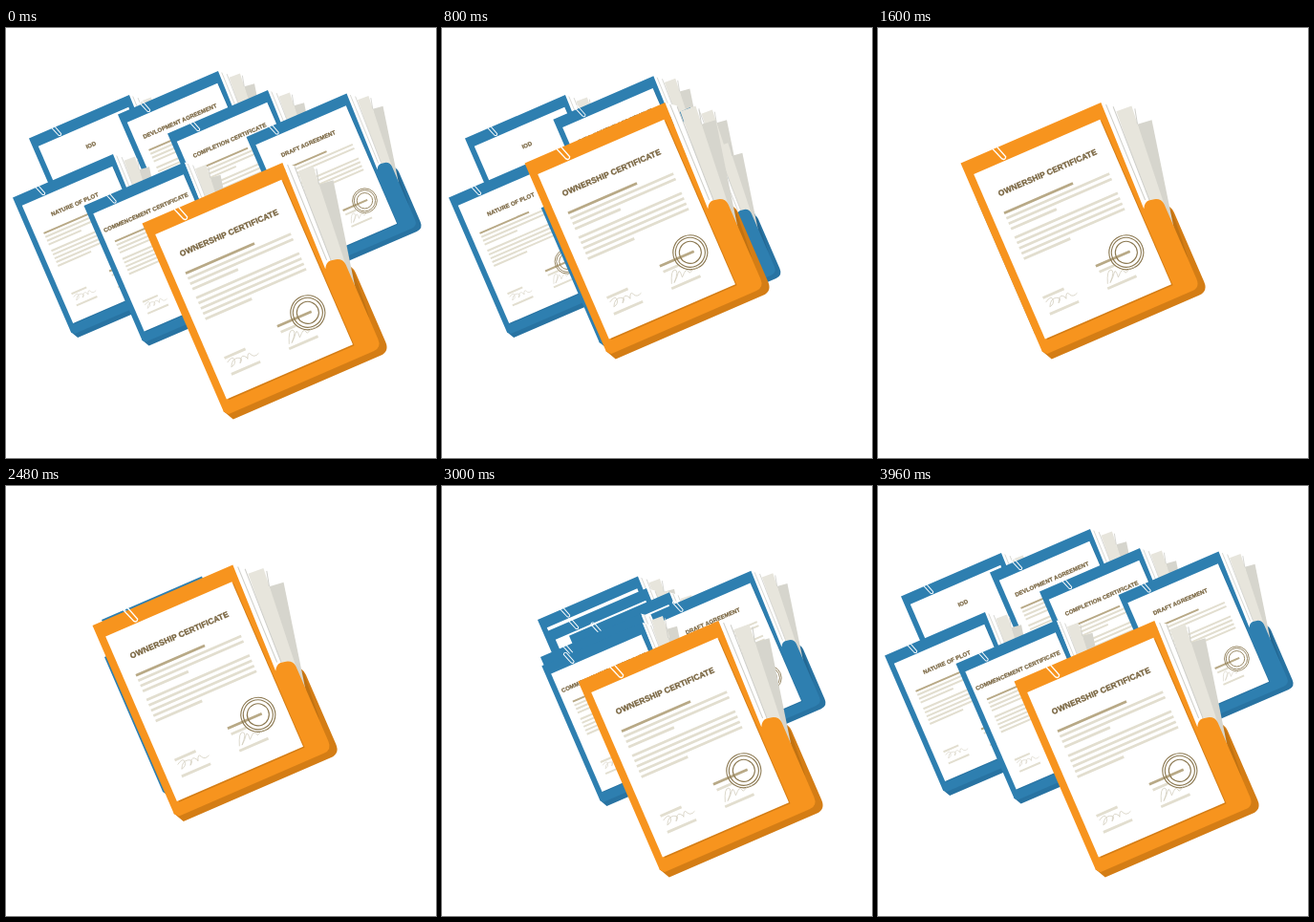
Recreate the animation shown at these times as an HTML page. Size 450x450 px, loop 4.4 s.

```html
<!DOCTYPE html>
<html lang="en">
<head>
<meta charset="utf-8">
<title>Folders</title>
<style>
html, body { margin: 0; width: 100%; height: 100%; overflow: hidden; background: #fff; }
svg { display: block; width: 100vw; height: 100vh; }
text {
  font: bold 8.4px "Liberation Sans", Arial, sans-serif; letter-spacing: .14px;
  fill: #78643f; stroke: #78643f; stroke-width: .35; text-anchor: middle;
}
.orange { --front: #f7941e; --back: #d47d15; --shade: #c07212; }
.blue { --front: #2e7fb0; --back: #2873a2; --shade: #236792; }
.front { fill: var(--front); }
.back { fill: var(--back); }
.shade { fill: var(--shade); }
.dark { stroke: #b8a986; }
.light { stroke: #e2decf; }
.dark, .light { stroke-width: 2.8; fill: none; }
.ring { fill: none; stroke: #8b7850; stroke-width: 1.1; }
.pen { fill: none; stroke: #d3cdbd; stroke-width: .7; }
.clip { fill: none; stroke: #fff; stroke-width: 1.3; stroke-linecap: round; }
</style>
</head>
<body>
<svg id="stage" viewBox="0 0 450 450"></svg>
<script>
const LOOP = 4400, STEP = 40, OUT = 560, IN = 600, TILT = -23.4;

// Back to front: title, home x and y, shift when stacked, start of gathering, start of spreading
const folders = [
  ["IOD", 24, 115.5, 76, 24.5, 1000, 3400],
  ["DEVLOPMENT AGREEMENT", 117, 90.5, -8, 62, 750, 3100],
  ["COMPLETION CERTIFICATE", 169, 110.5, -42, 54, 600, 2920],
  ["DRAFT AGREEMENT", 251.5, 114, -103, 63, 333, 2620],
  ["NATURE OF PLOT", 7, 177.5, 96, 1.5, 867, 3240],
  ["COMMENCEMENT CERTIFICATE", 81.5, 186, 40, 4, 467, 2760],
  ["OWNERSHIP CERTIFICATE", 142.5, 204.5, -56, -63, 200, 2440]
];

const rows = list => list.map(([x, y, end]) => `M${x} ${y}H${end}`).join("");
const long = [72, 78, 94, 100, 106, 112].map(y => [21, y, 138.5]);
const lightRows = rows([...long, [21, 84, 73], [21, 118, 74],
  [88, 162, 105], [89, 181.5, 122], [23, 163.5, 47], [23, 182, 56]]);
const darkRows = rows([[21, 66, 99.5], [87, 155, 126]]);
const rings = [18, 15.5, 11.5].map(r => `<circle class="ring" cx="122" cy="154.500" r="${r}"/>`).join("");

const body = `
  <path class="light" d="${lightRows}"/>
  <path class="dark" d="${darkRows}"/>
  ${rings}
  <path class="pen" d="M24 169q8-5 8 0t-6 6q4-8 10-6t0 6q4-8 7-5t2 4q3-8 5-3t8 2"/>
  <path class="pen" d="M91 177q5-14 9-12t-6 12q5-4 8-8t2 6q4-4 6-5t3 4q6-4 11-2"/>`;

const drawFolder = title => `
  <path class="back" d="M0 214L6 226H174Q184.500 226 184.500 215V136Q184.500 128 177 124L160 114Z"/>
  <path class="shade" d="M170 118L178 123Q183 128 183 136L179 186Z"/>
  <path fill="#d6d5cd" d="M186 36L201.500 38L178 150L170 130Z"/>
  <path fill="#fff" d="M172 22L186 28L175 134L166 120Z"/>
  <path fill="#e7e5dc" d="M171 15L188 16L178 128L164 118Z"/>
  <path fill="#fff" d="M160 0L170 8L166 120H156Z"/>
  <path fill="none" stroke="#cfcfca" d="M164 4L162 112M170 9L166 114M190 20L186 36"/>
  <path class="front" d="M0 0H160L157 120Q160 114 165 114L171 115Q178 117 178.500 124V209Q178.500 219 169 219H4L0 215Z"/>
  <path class="back" d="M10 18H153V205.500H10Z"/>
  <path fill="#fff" d="M8 16H152V204H8Z"/>
  <text x="79.500" y="48">${title}</text>
  ${title === "IOD" ? "" : body}
  <path class="clip" d="M38 3L41.500 13q2.500 3 4.500-.5L41-3q-3-3-5 .5L40 9"/>`;

const stage = document.getElementById("stage");
const isFront = i => i === folders.length - 1;
stage.innerHTML = folders.map(([title], i) =>
  `<g class="${isFront(i) ? "orange" : "blue"}">${drawFolder(title)}</g>`).join("");

const clamp = v => Math.max(0, Math.min(1, v));

function render(now) {
  const t = Math.floor(now % LOOP / STEP) * STEP;
  folders.forEach(([, x, y, dx, dy, gather, spread], i) => {
    const k = clamp((t - gather) / IN) - clamp((t - spread) / OUT);
    stage.children[i].setAttribute("transform",
      `translate(${x + dx * k} ${y + dy * k}) rotate(${TILT}) scale(${isFront(i) ? 1 : 0.715})`);
  });
}

const start = performance.now();
function tick() {
  render(performance.now() - start);
  requestAnimationFrame(tick);
}
tick();
</script>
</body>
</html>
```
